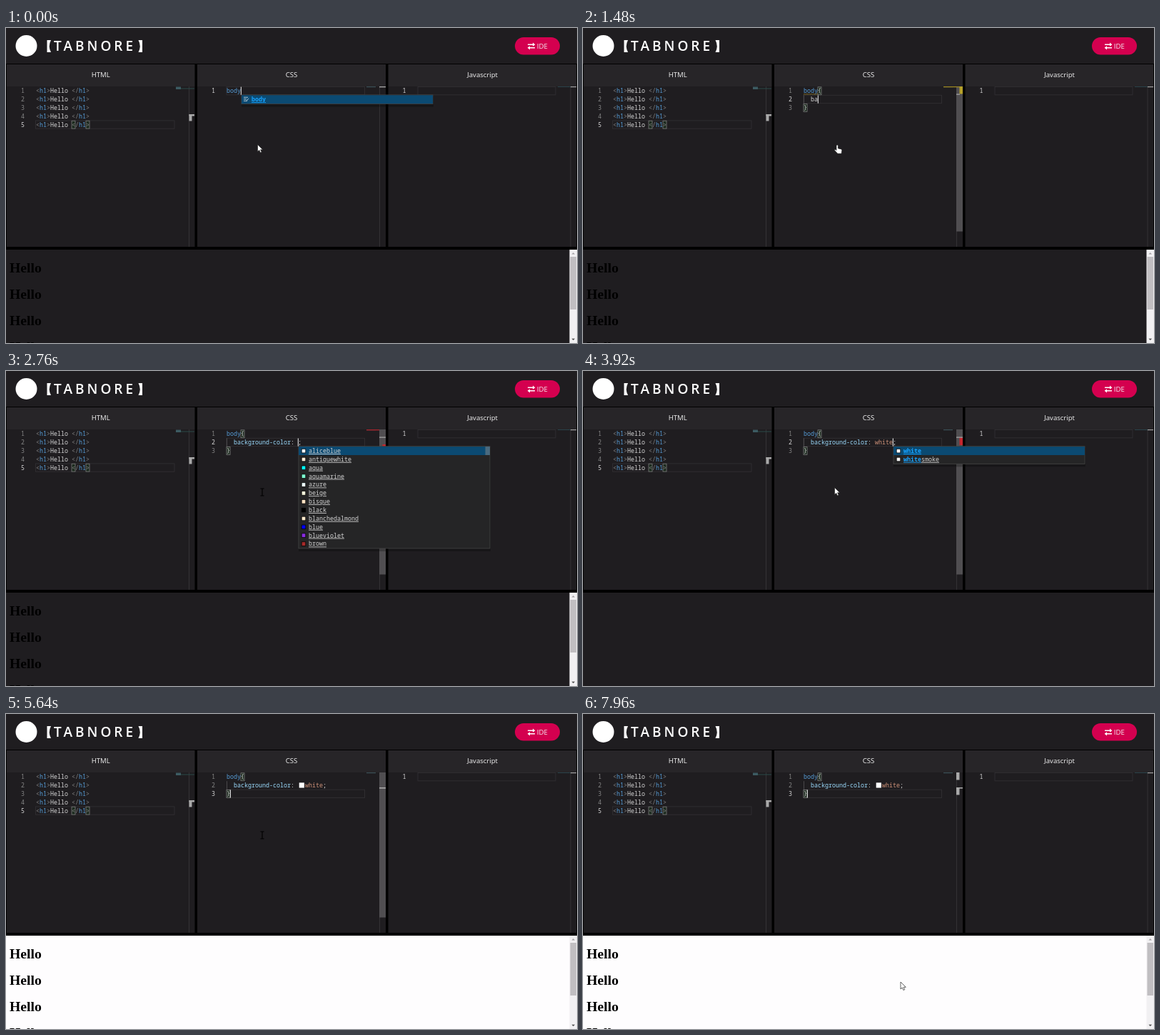
An HTML page for the animation above (8000 ms loop, 800 by 442 pixels).

```html
<!DOCTYPE html>
<html lang="en">
<head>
<meta charset="utf-8">
<title>Live code editor</title>
<style>
  html, body { margin: 0; width: 100%; height: 100%; overflow: hidden; background: #1f1d20; }
  svg { display: block; width: 800px; height: 442px; }
  text { white-space: pre; }
  .code { font: 8.33px "Noto Sans Mono", "DejaVu Sans Mono", monospace; }
  .ui { font: 9.6px "Open Sans", "Noto Sans", sans-serif; fill: #f4f4f4; }
  .brand { font: 600 19px "Open Sans", "Noto Sans", sans-serif; letter-spacing: 4px; fill: #fff; }
  .page { font: bold 19.7px "Liberation Serif", "Times New Roman", serif; fill: #000; }
  .mid { text-anchor: middle; }
  .end { text-anchor: end; }
</style>
</head>
<body>
<svg viewBox="0 0 800 442">
  <rect width="800" height="442" fill="#1f1d20"/>
  <circle cx="28.5" cy="25" r="15" fill="#fff"/>
  <path d="M57.5 17h5.5q-4.5 8.5 0 17h-5.5zM191 17h-5.5q4.5 8.5 0 17h5.5z" fill="#fff"/>
  <text class="brand" x="67" y="32">TABNORE</text>
  <rect x="713" y="13" width="63" height="24.5" rx="12.2" fill="#d4004f"/>
  <path d="M731 23.2h8M733 27.8h8" stroke="#fff" stroke-width="1.4"/>
  <path d="M738 20.6l3.4 2.6-3.4 2.6zM734 25.2l-3.4 2.6 3.4 2.6z" fill="#fff"/>
  <text class="ui" x="743.8" y="28.8">IDE</text>
  <rect y="50" width="800" height="261" fill="#000"/>
  <g id="panels"></g>
  <g id="preview"></g>
  <g id="editor"></g>
  <g id="mouse"></g>
</svg>
<script>
const LOOP = 8000, CH = 5, LH = 11.86, TOP = 82.3;
const $ = id => document.getElementById(id);
const rowY = row => TOP + row * LH;
const rect = (x, y, w, h, fill, more = '') =>
  `<rect x="${x}" y="${y}" width="${w}" height="${h}" fill="${fill}" ${more}/>`;
const text = (x, y, s, cls, more = '') =>
  `<text x="${x}" y="${y}" class="${cls}" ${more}>${s.replace(/</g, '&lt;')}</text>`;
const code = (x, row, s, fill, more = '') =>
  text(x, rowY(row) + 8.8, s, 'code', `fill="${fill}" ${more}`);
const number = (x, row, active) =>
  text(x, rowY(row) + 8.8, String(row + 1), 'code end', `fill="${active ? '#d6d6d6' : '#858585'}"`);
const lineBox = (x, row, w) =>
  rect(x, rowY(row) + .2, w, LH - .6, 'none', 'stroke="#2f2d30"');
const bracketBox = (x, row) =>
  rect(x, rowY(row) + .5, CH, LH - 1, '#1c2a1e', 'stroke="#7d7d7d" stroke-width=".8"');

const BLUE = '#569cd6', PLAIN = '#d4d4d4', GREY = '#808080';

function panels() {
  let out = '';
  [[1, 263.5, 132.7, 'HTML'], [268, 264, 400, 'CSS'], [535.5, 263.5, 667.6, 'Javascript']]
    .forEach(([x, w, mid, name]) => {
      out += rect(x, 51, w, 31, '#272528') + rect(x, 82, w, 225, '#1f1d20');
      out += text(mid, 68.6, name, 'ui mid');
    });
  [256, 523, 790.5].forEach(x => out += rect(x, 82, 1, 225, '#343235'));

  out += lineBox(41.5, 4, 194.5) + bracketBox(92, 4) + bracketBox(112, 4);
  for (let i = 0; i < 5; i++) {
    out += number(26, i, i === 4);
    [[0, '<', GREY], [1, 'h1', BLUE], [3, '>', GREY], [4, 'Hello ', PLAIN],
     [10, '</', GREY], [12, 'h1', BLUE], [14, '>', GREY]]
      .forEach(([col, s, fill]) => out += code(42 + col * CH, i, s, fill));
  }
  out += rect(238, 82.5, 7, 3.5, '#3c5b62') + rect(245, 84.5, 19, 1, '#2b4a48');
  out += rect(256.5, 121, 7.5, 2.5, '#a9a9a9') + rect(256.5, 121, 4, 9.5, '#a9a9a9');

  out += lineBox(577, 0, 193) + number(560.5, 0, true);
  return out + rect(773, 82, 18, 1, '#29434a') + rect(791, 82, 8, 1.2, '#a0a0a0');
}

const PROPS = ['backdrop-filter', 'backface-visibility', 'background', 'background-attachment',
  'background-blend-mode', 'background-clip', 'background-color', 'background-image',
  'background-origin', 'background-position', 'background-repeat', 'background-size'];
const COLORS = ['aliceblue', 'antiquewhite', 'aqua', 'aquamarine', 'azure', 'beige', 'bisque',
  'black', 'blanchedalmond', 'blue', 'blueviolet', 'brown'];
const WHITES = ['white', 'whitesmoke'];
const BG = 'background-color: ';

// list: suggestions, typed: matched prefix, key: reloads the preview
const STEPS = [
  { t: 0, css: ['body'], row: 0, col: 4, list: ['body'], typed: 'body' },
  { t: 360, css: ['body{}'], row: 0, col: 5, key: 1 },
  { t: 760, css: ['body{', '', '}'], row: 1, col: 2, key: 1 },
  prop(1160, 'b', PROPS, 1),
  prop(1440, 'ba', null, 1),
  prop(1520, 'ba', PROPS),
  prop(1680, 'bac', PROPS, 1),
  prop(1840, 'back', PROPS, 1),
  prop(2000, 'backg', PROPS.slice(2), 1),
  ...[1, 2, 3, 4].map(n => prop(2080 + n * 70, 'backg', PROPS.slice(2), 0, n)),
  value(2440, '', null, 1),
  value(2560, '', COLORS),
  value(2960, 'w', [...WHITES, 'wheat'], 1),
  value(3160, 'wh', [...WHITES, 'wheat'], 1),
  value(3400, 'whi', WHITES, 1),
  value(3600, 'whit', WHITES, 1),
  value(3840, 'white', WHITES, 1),
  value(4360, 'white', null),
  { ...value(4440, 'white', null), swatch: 1 },
  { ...value(4560, 'white', null), swatch: 1, row: 2, col: 1, move: 1 }
];
function prop(t, s, list, key, sel = 0) {
  return { t, css: ['body{', s, '}'], row: 1, col: 2 + s.length, list, typed: s, key, sel };
}
function value(t, s, list, key) {
  return { t, css: ['body{', BG + s + ';', '}'], row: 1, col: 2 + BG.length + s.length,
    list, typed: s, key, swatches: 1 };
}

function popup(s, x) {
  const y = rowY(s.row + 1) - .3, n = s.list.length, px = x + 1;
  let out = rect(px, y + 2, 269, n * LH + 3, '#000', 'opacity=".25"');
  out += rect(px, y, 268, n * LH + .9, '#252526', 'stroke="#454545" stroke-width=".8"');
  s.list.forEach((name, i) => {
    const top = y + i * LH + .4, base = top + 8.9;
    if (i === (s.sel || 0)) out += rect(px, top, 268, LH, '#0b4a72');
    if (s.swatches) {
      out += rect(px + 4.2, top + 3.2, 5.6, 5.6, name, 'stroke="#000" stroke-width=".7"');
    } else {
      out += `<path d="M${px + 3} ${top + 3}h6M${px + 3} ${top + 5.5}h4M${px + 3} ${top + 8}h5M${px + 7} ${top + 8}l3-3.5" stroke="#b9c7d0" fill="none"/>`;
    }
    const hit = name.startsWith(s.typed) ? s.typed.length : 0;
    const line = 'text-decoration="underline"';
    if (hit) out += text(px + 14, base, name.slice(0, hit), 'code', `style="font-weight:bold" fill="#18a3ff" ${line}`);
    if (hit < name.length) out += text(px + 14 + hit * CH, base, name.slice(hit), 'code', `fill="${PLAIN}" ${line}`);
  });
  if (n > 9) out += rect(px + 261.5, y + .4, 6.5, LH, '#8a8a8a', 'opacity=".5"');
  return out;
}

function ruler(t, s) {
  const slider = t < 760 ? 0 : 1 - Math.min(1, Math.max(0, (t - 6250) / 230));
  let out = rect(505, 82, 13, 1.2, '#3a4f55');
  if (slider) out += rect(523, 82, 9, 203.5, '#504e51', `opacity="${slider}"`);
  if (t < 760) return out + rect(523, 82, 9, 1.3, '#a9a9a9');
  if (t < 1600) {
    return out + rect(505, 82, 26, 1.2, '#a08a20') + rect(527.5, 82, 4.5, 10.5, '#b5a02a') +
      rect(523, 92.5, 5, 1.2, '#a9a9a9');
  }
  if (t < 4100) {
    out += t < 3400
      ? rect(505, 82, 18, 1.4, '#a3242c') + rect(527.5, 103, 4.5, 3, '#c4262e')
      : rect(527.5, 93.5, 4.5, 10.5, '#c4262e');
    return out + rect(523, 92.5, 9, 1.2, '#a9a9a9');
  }
  if (t < 4560) return out + rect(523, 92.5, 9, 1.2, '#a9a9a9');
  out += rect(523, 103, 9, 1.6, '#a9a9a9');
  if (t > 6250) out += rect(523, 82, 4.5, 10.5, '#a9a9a9') + rect(523, 103, 4.5, 10.5, '#a9a9a9');
  return out;
}

function editor(t, s, lastKey) {
  const X = 309, last = s.css.length - 1;
  let out = ruler(t, s) + lineBox(X, s.row, 193.5);
  s.css.forEach((_, i) => out += number(293, i, i === s.row));
  if (s.css[0].length > 4) {
    const endCol = last ? 0 : 5;
    out += bracketBox(X + 4 * CH, 0) + bracketBox(X + endCol * CH, last);
    out += code(X + 4 * CH, 0, '{', PLAIN) + code(X + endCol * CH, last, '}', PLAIN);
  }
  out += code(X, 0, 'body', BLUE);
  if (last) {
    out += rect(X, rowY(1), 1, LH, '#4a484b');
    const x = X + 2 * CH, line = s.css[1];
    if (line.startsWith(BG)) {
      const vx = x + BG.length * CH + (s.swatch ? 10 : 0), val = line.slice(BG.length, -1);
      out += code(x, 1, 'background-color', '#9cdcfe') + code(x + 16 * CH, 1, ':', PLAIN);
      out += code(vx, 1, val, '#ce9178') + code(vx + val.length * CH, 1, ';', PLAIN);
      if (s.swatch) out += rect(410.7, rowY(1) + 2.2, 7.2, 7.2, '#fff');
    } else {
      out += code(x, 1, line, PLAIN);
    }
    if (t < 1600) {
      out += `<path d="M${X} 93.5${'l1.25-1.2 1.25 1.2'.repeat(8)}" stroke="#b5952a" stroke-width=".7" fill="none"/>`;
    }
  }
  const cx = X + s.col * CH;
  if ((t - lastKey) % 1000 < 500) out += rect(cx - .2, rowY(s.row) + .3, 1.1, LH - .6, '#e0e0e0');
  if (s.list) out += popup(s, cx);
  return out;
}

function preview(t, sinceReload) {
  if (sinceReload >= 60 && sinceReload < 140) return '';
  let out = t >= 3980 ? rect(0, 311, 790, 131, '#fefdfe') : '';
  for (let i = 0; i < 4; i++) out += text(5, 343.3 + i * 36.8, 'Hello', 'page');
  out += rect(789.5, 311, 10.5, 131, '#f1f0f2') + rect(790.5, 321, 8.5, 74, '#c0bec1');
  return out + '<path d="M792.5 317.5l2.3-2.6 2.3 2.6z" fill="#a3a1a4"/>' +
    '<path d="M792.5 435.7l2.3 2.6 2.3-2.6z" fill="#505050"/>';
}

const shape = (x, y, d, fill, stroke, w) =>
  `<path transform="translate(${x} ${y})" d="${d}" fill="${fill}" stroke="${stroke}" stroke-width="${w}" stroke-linejoin="round"/>`;
const arrow = (x, y) =>
  shape(x, y, 'M0 0v10l2.3-2.1 1.6 3.6 1.8-.8-1.6-3.4h3.2z', '#fff', '#222', .7);
const beam = (x, y) =>
  shape(x, y, 'M-2.6-5h5.2M0-5v10M-2.6 5h5.2', 'none', '#000', 1.2);
const hand = (x, y) =>
  shape(x, y, 'M0 1q0-1.4 1.2-1.4t1.2 1.4v3.4l4.2 1q1.4.4 1.2 1.9l-.7 4.5h-5.300l-4.300-4.600q-.4-1.300 1-1.300l1.500 1.200z', '#fff', '#111', .6);

function mouse(t, s, sinceReload) {
  if (t > 6080) {
    const k = Math.min(1, (t - 6080) / 360), e = k * k * (3 - 2 * k);
    const x = 359 + 86 * e, y = 170 + 206 * e;
    return y < 307 ? beam(x, y) : arrow(x, y);
  }
  if (sinceReload >= 60 && sinceReload < 260) return arrow(352.5, 163.5);
  return t >= 1160 && t < 2440 ? hand(355, 164.5) : beam(359, 170);
}

const drawn = {};
function put(id, markup) {
  if (drawn[id] !== markup) $(id).innerHTML = drawn[id] = markup;
}

function frame() {
  const t = performance.now() % LOOP;
  let s = STEPS[0], reload = -160, lastKey = -160;
  for (const step of STEPS) {
    if (step.t > t) break;
    s = step;
    if (step.key) reload = step.t;
    if (step.key || step.move) lastKey = step.t;
  }
  put('preview', preview(t, t - reload));
  put('editor', editor(t, s, lastKey));
  put('mouse', mouse(t, s, t - reload));
  requestAnimationFrame(frame);
}

put('panels', panels());
frame();
</script>
</body>
</html>
```
